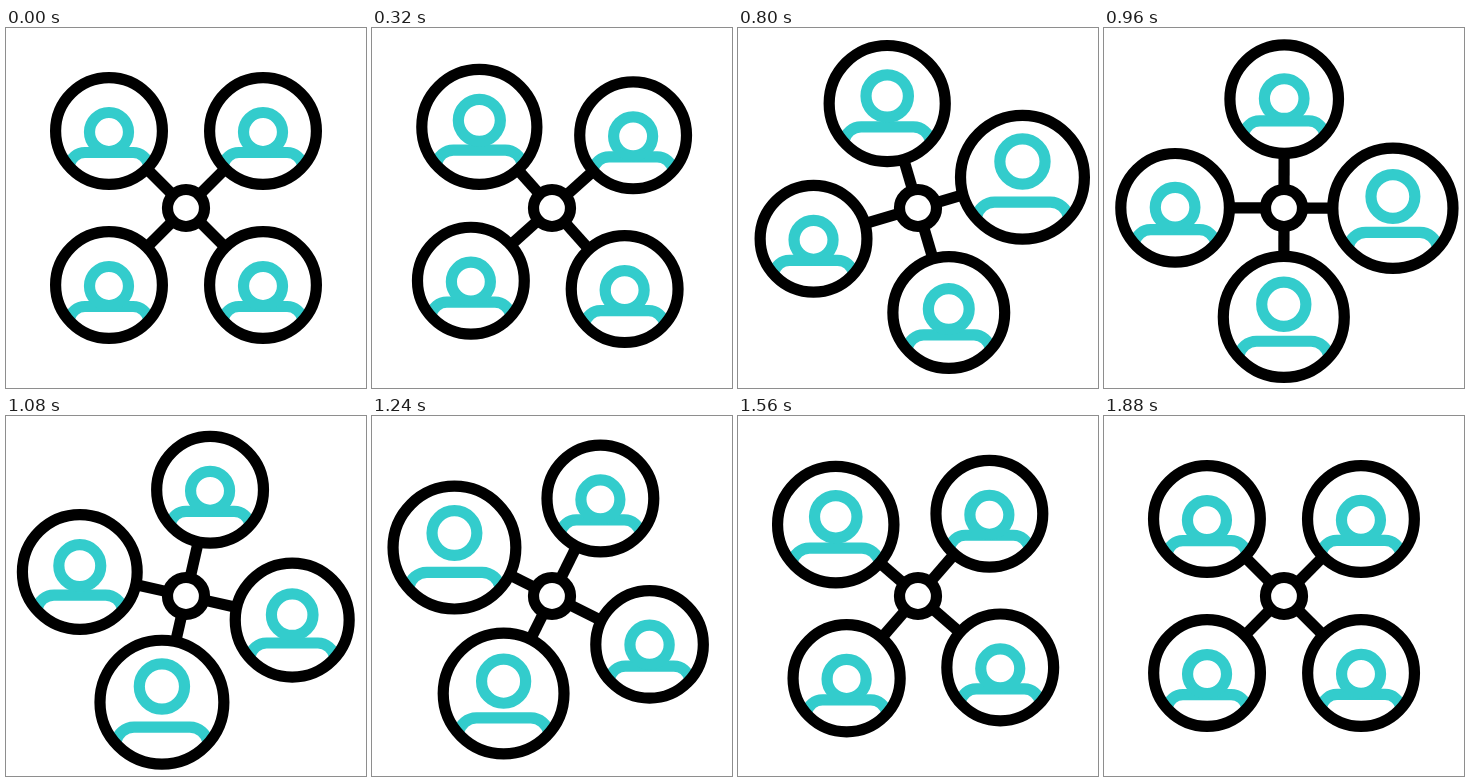
These frames come from a looping animation (360 px wide and 360 px high, 1920 ms). An HTML page:

```html
<!DOCTYPE html>
<html lang="en">
<head>
<meta charset="utf-8">
<title>Rotating network</title>
<style>
  html, body { margin: 0; width: 100%; height: 100%; overflow: hidden; background: #fff; }
  svg { display: block; width: 100vw; height: 100vh; }
</style>
</head>
<body>
<svg id="stage" viewBox="0 0 360 360" fill="none" stroke="#000" stroke-width="11.2">
  <g id="spokes"></g>
  <circle cx="180" cy="180" r="18.5"/>
  <g id="nodes"></g>
</svg>
<script>
const LOOP = 1920, CENTER = 180, ORBIT = 108.9, LINE = 11.2;
const PEAKS = [555, 795, 1090, 1320], RISE_TIME = 460, FALL_TIME = 520;
const GROWTH = 0.16, HEAD_RISE = 14.6;

// Symmetric cubic-bezier(k, 0, 1 - k, 1), solved by bisection.
function ease(x, k) {
  let lo = 0, hi = 1;
  for (let i = 0; i < 24; i++) {
    const t = (lo + hi) / 2, u = 1 - t;
    if (3 * k * t * u * u + 3 * (1 - k) * t * t * u + t * t * t < x) lo = t;
    else hi = t;
  }
  return lo * lo * (3 - 2 * lo);
}

function make(tag, parent, attrs) {
  const el = document.createElementNS("http://www.w3.org/2000/svg", tag);
  return set(parent.appendChild(el), attrs);
}

function set(el, attrs) {
  for (const name in attrs) el.setAttribute(name, attrs[name]);
  return el;
}

const spokes = document.getElementById("spokes");
const nodes = document.getElementById("nodes");

// Clockwise from the top left.
const people = PEAKS.map((peak, i) => {
  const spoke = make("line", spokes, {});
  const group = make("g", nodes, {});
  const icon = make("g", group, { stroke: "#33cccc" });
  make("path", icon, { d: "M-39.8 34.7A16 16 0 0 1-24 21.5H24A16 16 0 0 1 39.8 34.7" });
  const head = make("circle", icon, { r: 19.5 });
  make("circle", group, { r: 53.4 });
  return { spoke, group, head, peak, angle: -135 + 90 * i };
});

function pulseAt(offset) {
  const span = offset < 0 ? RISE_TIME : FALL_TIME;
  return ease(Math.max(0, 1 - Math.abs(offset) / span), 0.4);
}

function draw(time) {
  const turn = 90 * ease(time / LOOP, 0.57);
  for (const { spoke, group, head, peak, angle } of people) {
    const a = (angle + turn) * Math.PI / 180;
    const at = r => [CENTER + r * Math.cos(a), CENTER + r * Math.sin(a)];
    const [x1, y1] = at(22), [x2, y2] = at(51), [x, y] = at(ORBIT);
    const pulse = pulseAt(time - peak);
    const scale = 1 + GROWTH * pulse;
    set(spoke, { x1, y1, x2, y2 });
    // Shapes grow while their line weight stays constant.
    set(group, { transform: `translate(${x} ${y}) scale(${scale})`, "stroke-width": LINE / scale });
    set(head, { cy: 1 - HEAD_RISE * pulse });
  }
}

const start = performance.now();
function tick() {
  draw((performance.now() - start) % LOOP);
  requestAnimationFrame(tick);
}
tick();
</script>
</body>
</html>
```
